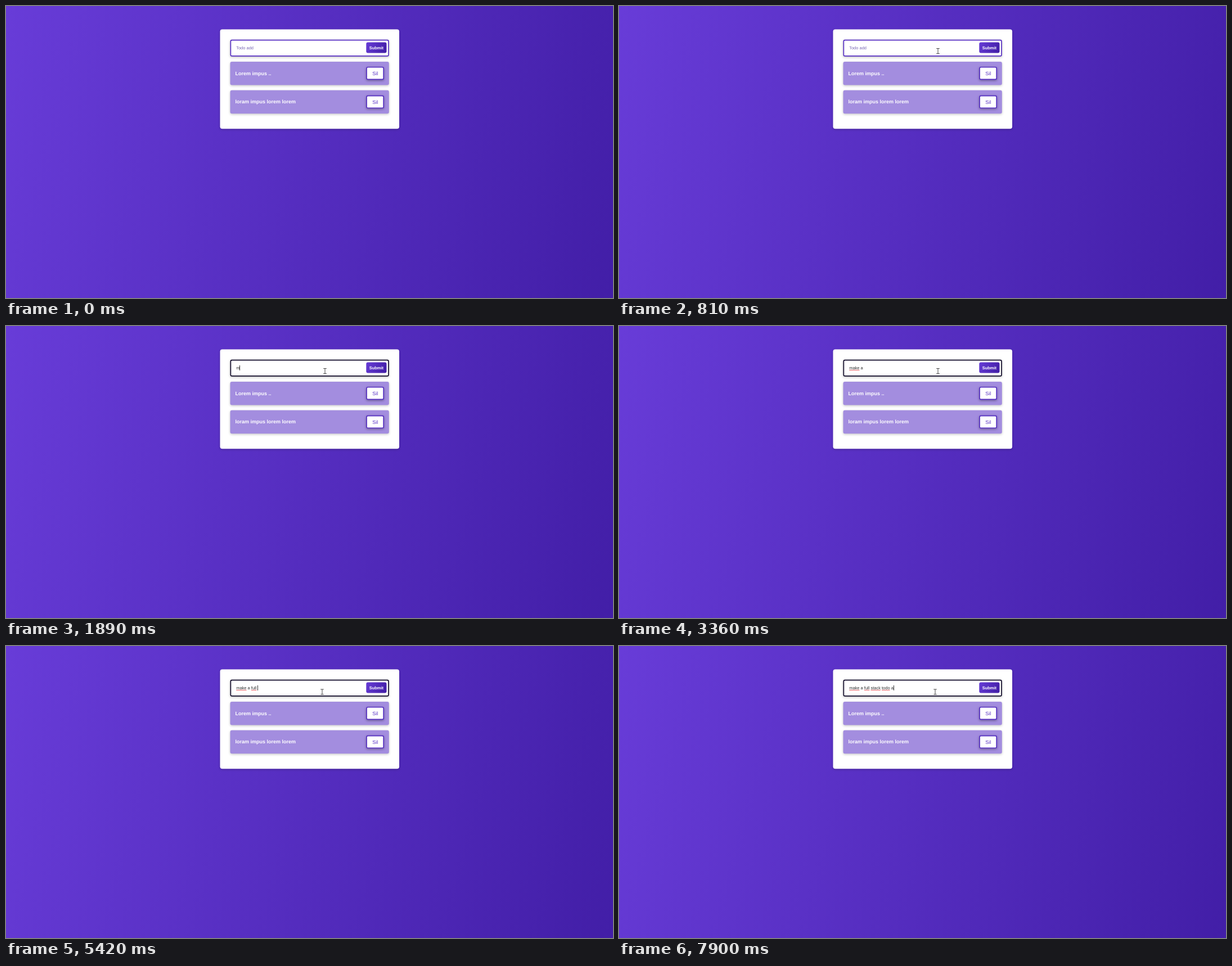
Animation of 1079 by 519 pixels, one loop 8000 ms. Source, as an HTML page with a canvas:

```html
<!DOCTYPE html>
<html lang="en">
<head>
<meta charset="utf-8">
<title>Todo</title>
<style>
  html, body { margin: 0; width: 100%; height: 100%; overflow: hidden; }
  body { background: linear-gradient(105deg, #683cd8, #421ea7); }
  canvas { display: block; }
</style>
</head>
<body>
<canvas id="stage" width="1079" height="519"></canvas>
<script>
const ctx = document.getElementById('stage').getContext('2d');
const LOOP = 8000;
const SANS = '"Liberation Sans", Arial, sans-serif';
const PURPLE = '#5831c4';
const TEXT_X = 409.2, FOCUS_AT = 1150, RIPPLE_END = 1480;

const PHRASE = 'make a full stack todo a';
const KEYS = [1890, 1960, 2080, 2210, 2360, 2550, 2810, 4630, 4760, 4950, 5150, 5420,
  5570, 5830, 5960, 6160, 6360, 6500, 6890, 7030, 7490, 7630, 7770, 7900];

// Pointer stops: time, x, y
const PATH = [
  [140, 837, 341], [200, 792, 262], [260, 759, 197],
  [460, 722, 174], [530, 672, 146], [600, 632, 122], [670, 602, 106], [740, 584, 97],
  [810, 567, 80], [4490, 565, 81], [4560, 562, 81.5]
];

function box(x, y, w, h, r, fill, shadow) {
  ctx.save();
  if (shadow) {
    ctx.shadowColor = shadow;
    ctx.shadowBlur = 4;
    ctx.shadowOffsetY = 1.5;
  }
  ctx.fillStyle = fill;
  ctx.beginPath();
  ctx.roundRect(x, y, w, h, r);
  ctx.fill();
  ctx.restore();
}

function framed(x, y, w, h, r, line, shadow) {
  box(x, y, w, h, r, line, shadow);
  box(x + 1.7, y + 1.7, w - 3.4, h - 3.4, r - 1.5, '#fff');
}

function text(str, x, y, font, color, align = 'left') {
  ctx.font = `${font} ${SANS}`;
  ctx.textAlign = align;
  ctx.fillStyle = color;
  ctx.fillText(str, x, y);
}

function row(y, title) {
  box(398.5, y, 282.3, 41.5, 3, '#a38ddf', 'rgba(0,0,0,.22)');
  text(title, 407.4, y + 23.7, 'bold 9px', '#fff');
  framed(640.2, y + 9, 31.8, 23.4, 3, PURPLE, 'rgba(0,0,0,.35)');
  text('Sil', 656.2, y + 24.5, '9px', PURPLE, 'center');
}

function typedText(t) {
  const count = KEYS.filter(k => k <= t).length;
  const typed = PHRASE.slice(0, count);
  if (count) text(typed, TEXT_X, 77.4, '7.49px', '#2d2d2d');
  else text('Todo add', TEXT_X, 77.4, '7.49px', '#7867b5');

  ctx.font = `7.49px ${SANS}`;
  const endOf = n => TEXT_X + ctx.measureText(PHRASE.slice(0, n)).width;

  // Spell-check marks under finished words
  for (const m of typed.matchAll(/\w{2,}(?= )/g)) {
    const from = endOf(m.index);
    ctx.fillStyle = 'rgba(222,58,62,.8)';
    ctx.fillRect(from, 78, endOf(m.index + m[0].length) - from, 1);
  }

  if (t < FOCUS_AT) return;
  const since = t - (count ? KEYS[count - 1] : FOCUS_AT);
  const blinkOff = Math.floor((since + 12) / 540) % 2 === 1;
  if (!blinkOff && !(t >= 4420 && t < KEYS[7])) {
    ctx.fillStyle = '#333';
    ctx.fillRect(Math.round(endOf(count)), 70, 1, 9);
  }
}

function arrow(x, y) {
  ctx.beginPath();
  [[.5, .5], [.5, 9.3], [2.5, 7.5], [3.8, 10.4], [5.2, 9.8], [3.9, 7], [6.6, 6.8]]
    .forEach(([dx, dy]) => ctx.lineTo(x + dx, y + dy));
  ctx.closePath();
  ctx.fillStyle = '#fff';
  ctx.strokeStyle = '#222';
  ctx.lineWidth = .6;
  ctx.fill();
  ctx.stroke();
}

function beam(x, y) {
  ctx.fillStyle = '#4a4a4a';
  ctx.fillRect(x - .5, y - 4.5, 1, 9);
  ctx.fillRect(x - 2.8, y - 5, 5.6, 1);
  ctx.fillRect(x - 2.8, y + 4, 5.6, 1);
}

function pointer(t) {
  const stop = PATH.filter(p => p[0] <= t).pop();
  if (!stop) return;
  const [at, x, y] = stop;
  if (t >= FOCUS_AT && t < RIPPLE_END) {
    ctx.fillStyle = 'rgba(255,255,0,.47)';
    ctx.beginPath();
    ctx.arc(566, 80, 7, 0, Math.PI * 2);
    ctx.fill();
  }
  (at < 810 ? arrow : beam)(x, y);
}

function draw(t) {
  ctx.clearRect(0, 0, 1079, 519);
  ctx.textRendering = 'geometricPrecision';
  box(380.5, 41.6, 318.5, 176.7, 4, '#fff', 'rgba(0,0,0,.2)');

  const line = t >= FOCUS_AT ? '#130d2b' : PURPLE;
  framed(398.5, 59.8, 282.3, 30, 3, line, 'rgba(0,0,0,.25)');

  const grad = ctx.createLinearGradient(642, 66, 675, 82);
  grad.addColorStop(0, '#643ad3');
  grad.addColorStop(1, '#421ea7');
  box(640.3, 64.5, 36.2, 19, 3, grad);
  text('Submit', 658.4, 76.9, 'bold 7.49px', '#fff', 'center');

  row(98.9, 'Lorem impus ..');
  row(149.7, 'loram impus lorem lorem');
  typedText(t);
  pointer(t);
}

const start = performance.now();
function tick() {
  draw((performance.now() - start) % LOOP);
  requestAnimationFrame(tick);
}
tick();
</script>
</body>
</html>
```
